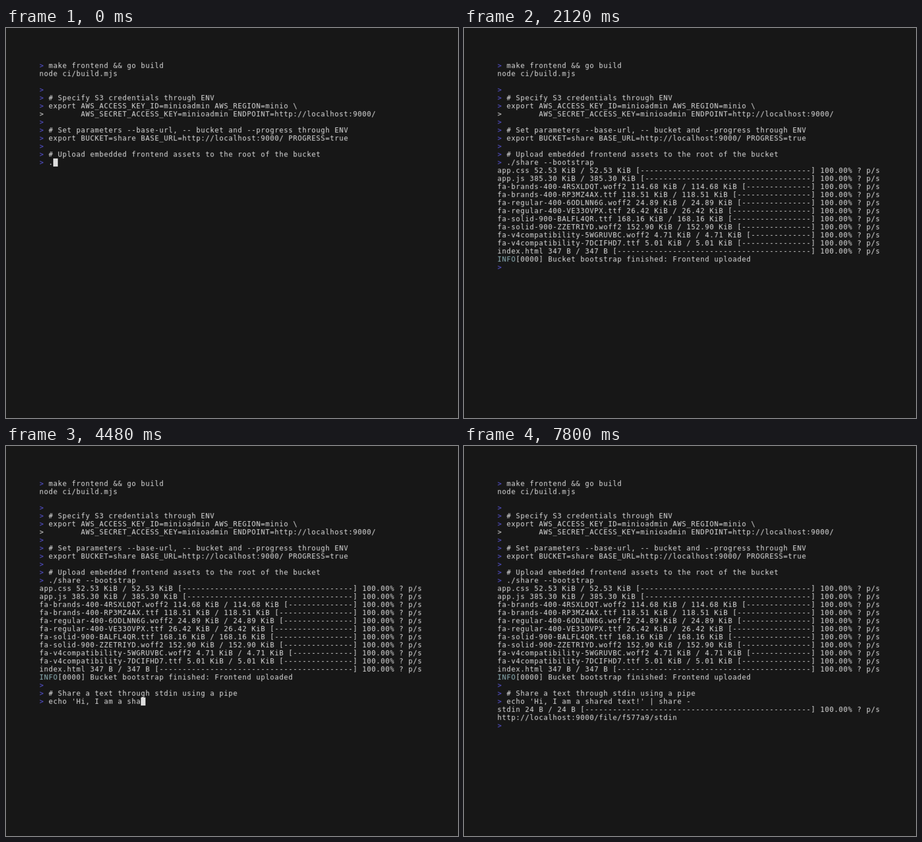
An HTML page with a canvas that plays this animation: 805 by 695 pixels, repeating every 8000 ms.

```html
<!DOCTYPE html>
<html lang="en">
<head>
<meta charset="utf-8">
<title>Terminal session</title>
<style>
  html, body { margin: 0; width: 100%; height: 100%; overflow: hidden; background: #171717; }
  canvas { display: block; }
</style>
</head>
<body>
<canvas id="stage" width="805" height="695"></canvas>
<script>
const LOOP = 8000, TICK = 40;
const COLS = 83, ROWS = 40, CELL_W = 8, CELL_H = 14, BASELINE = 11;
const SCALE = 575 / (ROWS * CELL_H), LEFT = 59.5, TOP = 60;
const BACK = '#171717', TEXT = '#ddd', PROMPT = '#5a56e0', INFO = '#8fb3b8';

const bar = (name, size) => `${name} ${size} / ${size} [`.padEnd(68, '-') + '] 100.00% ? p/s';

const intro = String.raw`> make frontend && go build
node ci/build.mjs

>
> # Specify S3 credentials through ENV
> export AWS_ACCESS_KEY_ID=minioadmin AWS_REGION=minio \
>        AWS_SECRET_ACCESS_KEY=minioadmin ENDPOINT=http://localhost:9000/
>
> # Set parameters --base-url, -- bucket and --progress through ENV
> export BUCKET=share BASE_URL=http://localhost:9000/ PROGRESS=true
>
> # Upload embedded frontend assets to the root of the bucket`.split('\n');

const uploads = [
  bar('app.css', '52.53 KiB'),
  bar('app.js', '385.30 KiB'),
  bar('fa-brands-400-4RSXLDQT.woff2', '114.68 KiB'),
  bar('fa-brands-400-RP3MZ4AX.ttf', '118.51 KiB'),
  bar('fa-regular-400-6ODLNN6G.woff2', '24.89 KiB'),
  bar('fa-regular-400-VE33OVPX.ttf', '26.42 KiB'),
  bar('fa-solid-900-BALFL4QR.ttf', '168.16 KiB'),
  bar('fa-solid-900-ZZETRIYD.woff2', '152.90 KiB'),
  bar('fa-v4compatibility-5WGRUVBC.woff2', '4.71 KiB'),
  bar('fa-v4compatibility-7DCIFHD7.ttf', '5.01 KiB'),
  bar('index.html', '347 B'),
  'INFO[0000] Bucket bootstrap finished: Frontend uploaded'
];
const bootstrap = './share --bootstrap';
const echo = "echo 'Hi, I am a shared text!' | share -";
const shared = [bar('stdin', '24 B'), 'http://localhost:9000/file/f577a9/stdin'];

// The last line returned is the one holding the cursor.
function linesAt(t) {
  const typed = Math.floor((t + 75) / 50);
  const lines = [...intro, '> ' + bootstrap.slice(0, typed)];
  if (t < 1440) return lines;
  if (t < 1560) return [...lines, ...uploads.slice(0, (t - 1440) / TICK * 5.5), ''];
  lines.push(...uploads);
  if (t < 3320) return [...lines, '> '];
  // A short hesitation delays the second half of the command.
  const count = t < 4160 ? (t - 3410) / 50 : (t - 3450) / 50;
  lines.push('>', '> # Share a text through stdin using a pipe',
    '> ' + echo.slice(0, Math.max(0, Math.floor(count))));
  return t < 6040 ? lines : [...lines, ...shared, '> '];
}

const cursorHidden = t => (t >= 2120 && t < 2720) || (t >= 6640 && t < 7200) || t >= 7800;

function colorOf(line, col) {
  if (col === 0 && /^>(?!  )/.test(line)) return PROMPT;
  return col < 4 && line.startsWith('INFO') ? INFO : TEXT;
}

const stage = document.getElementById('stage').getContext('2d');
const grid = document.createElement('canvas');
grid.width = COLS * CELL_W;
grid.height = ROWS * CELL_H;
const term = grid.getContext('2d');
term.font = '12px "DejaVu Sans Mono", monospace';
stage.imageSmoothingQuality = 'high';

function drawTerminal(t) {
  term.fillStyle = BACK;
  term.fillRect(0, 0, grid.width, grid.height);
  const lines = linesAt(t);
  lines.forEach((line, row) => [...line].forEach((char, col) => {
    term.fillStyle = colorOf(line, col);
    term.fillText(char, col * CELL_W, row * CELL_H + BASELINE);
  }));
  if (cursorHidden(t)) return;
  term.fillStyle = TEXT;
  term.fillRect(lines.at(-1).length * CELL_W, (lines.length - 1) * CELL_H, CELL_W, CELL_H);
}

let shown = -1;
function draw(now) {
  const t = Math.floor(now % LOOP / TICK) * TICK;
  if (t !== shown) {
    shown = t;
    drawTerminal(t);
    stage.fillStyle = BACK;
    stage.fillRect(0, 0, 805, 695);
    // The character grid is slightly enlarged to fill the padded window.
    stage.drawImage(grid, LEFT, TOP, grid.width * SCALE, grid.height * SCALE);
  }
  requestAnimationFrame(draw);
}
draw(performance.now());
</script>
</body>
</html>
```
